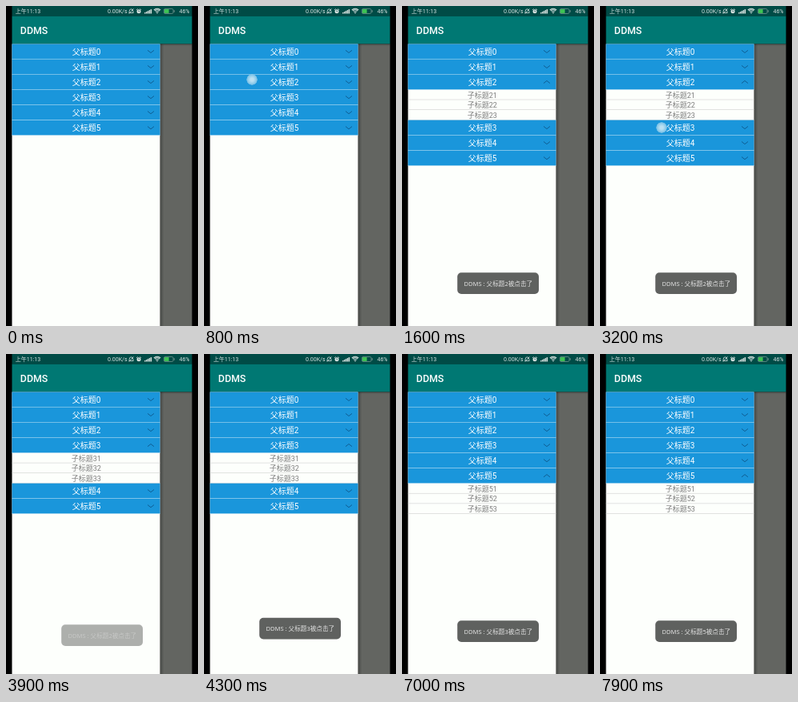
An HTML page with a canvas for the animation above (8000 ms loop, 240x400 px).

```html
<!DOCTYPE html>
<html lang="zh">
<head>
<meta charset="utf-8">
<style>
html, body { margin: 0; width: 100%; height: 100%; overflow: hidden; background: #000; }
canvas { display: block; width: 240px; height: 400px; }
</style>
</head>
<body>
<canvas id="stage"></canvas>
<script>
const LOOP = 8000, STEP = 100;
const FONT = 'Roboto, "Noto Sans CJK SC", "Noto Sans CJK", sans-serif';
const TOAST_FONT = '"Noto Sans", "Noto Sans CJK SC", "Noto Sans CJK", sans-serif';
// a 9:16 screen centred on the stage
const LEFT = 7.5, WIDTH = 225, DRAWER = 185, TOP = 47.5;
const ROW = 19.06, CHILD = 12.65, RULE = 0.6;
const canvas = document.getElementById('stage');
const ctx = canvas.getContext('2d');
const dpr = window.devicePixelRatio || 1;
canvas.width = 240 * dpr;
canvas.height = 400 * dpr;

const taps = [
  { at: 700, x: 60, y: 92, row: 2, open: 900 },
  { at: 3100, x: 77, y: 152, row: 3, open: 3400 },
  { at: 5900, x: 77, y: 190, row: 5, open: 6200 }
];
const toasts = [
  { row: 2, from: 1000, to: 3750 },
  { row: 3, from: 4100, to: 7050 },
  { row: 5, from: 7300, to: 10000 }
];

function rect(x, y, w, h, color) {
  ctx.fillStyle = color;
  ctx.fillRect(x, y, w, h);
}

function text(str, x, y, size, color, align = 'left', weight = 400, font = FONT) {
  ctx.font = `${weight} ${size}px ${font}`;
  ctx.fillStyle = color;
  ctx.textAlign = align;
  ctx.textBaseline = 'alphabetic';
  ctx.fillText(str, x, y);
}

function line(points, color, width) {
  ctx.beginPath();
  points.forEach(([x, y]) => ctx.lineTo(x, y));
  ctx.strokeStyle = color;
  ctx.lineWidth = width;
  ctx.stroke();
}

function disc(x, y, r, color) {
  ctx.beginPath();
  ctx.arc(x, y, r, 0, Math.PI * 2);
  ctx.fillStyle = color;
  ctx.fill();
}

function statusBar() {
  const ink = '#dbe4e2', back = '#004b46';
  rect(LEFT, 0, WIDTH, 12.5, back);
  text('上午11:13', 11.8, 9.2, 7, ink);
  text('0.00K/s', 127, 9.2, 7, ink);
  // muted bell
  ctx.beginPath();
  ctx.arc(156.5, 6.1, 2.2, Math.PI, 0);
  ctx.lineTo(159.2, 8.6);
  ctx.lineTo(153.8, 8.6);
  ctx.closePath();
  ctx.strokeStyle = ink;
  ctx.lineWidth = 0.8;
  ctx.stroke();
  line([[153.8, 9.6], [159.4, 3.4]], ink, 0.8);
  // alarm clock
  disc(166, 6.8, 2.5, ink);
  line([[163.2, 4.8], [164.6, 3.6]], ink, 1);
  line([[168.8, 4.8], [167.4, 3.6]], ink, 1);
  line([[166, 5.4], [166, 7], [167, 7]], back, 0.7);
  for (let i = 0; i < 5; i++) rect(173 + i * 1.9, 8.1 - i, 1.5, 1.4 + i, ink);
  // wifi
  ctx.strokeStyle = ink;
  ctx.lineWidth = 1.1;
  for (const r of [2.4, 4.2, 5.8]) {
    ctx.beginPath();
    ctx.arc(189, 9.1, r, -Math.PI * 0.75, -Math.PI * 0.25);
    ctx.stroke();
  }
  disc(189, 8.8, 0.8, ink);
  // battery
  ctx.strokeStyle = '#7d9c96';
  ctx.lineWidth = 0.7;
  ctx.beginPath();
  ctx.roundRect(197.4, 3.5, 11.6, 6, 1.5);
  ctx.stroke();
  rect(198, 4.1, 5.6, 4.8, '#3fc455');
  rect(209.6, 5.2, 1, 2.6, '#7d9c96');
  text('46%', 229.5, 9.2, 7, ink, 'right');
}

function drawer(open) {
  rect(LEFT, TOP, DRAWER, 400 - TOP, '#fdfffc');
  let y = TOP;
  for (let i = 0; i < 6; i++) {
    rect(LEFT, y, DRAWER, ROW, '#1a96db');
    rect(LEFT, y + ROW - RULE, DRAWER, RULE, '#d4ebf7');
    text('父标题' + i, 100.5, y + 13.2, 10, '#fff', 'center');
    const d = i === open ? -1 : 1;
    const c = y + 9.4;
    line([[177, c - 1.6 * d], [181, c + 1.6 * d], [185, c - 1.6 * d]], '#0f5f95', 1);
    y += ROW;
    if (i !== open) continue;
    for (let k = 1; k <= 3; k++) {
      text(`子标题${i}${k}`, 100.3, y + 9.9, 9, '#7c7c7c', 'center');
      y += CHILD;
      rect(LEFT, y - RULE, DRAWER, RULE, '#cfcfcf');
    }
  }
}

function touch(x, y) {
  const g = ctx.createRadialGradient(x, y, 2, x, y, 7);
  g.addColorStop(0, 'rgba(205,232,244,0.9)');
  g.addColorStop(0.65, 'rgba(170,216,238,0.8)');
  g.addColorStop(0.9, 'rgba(150,205,234,0.7)');
  g.addColorStop(1, 'rgba(150,205,234,0)');
  disc(x, y, 7, g);
}

// rise past the resting place, then settle; sink and fade on leaving
function toast(item, t) {
  const age = t - item.from;
  if (age < 0 || t >= item.to + 300) return;
  let dy = 0, alpha = 1;
  if (t > item.to) {
    const p = (t - item.to) / 300;
    dy = 20 * p * p;
    alpha = 1 - p;
  } else if (age < 200) {
    const p = age / 200;
    dy = 12 - 15.5 * p * (2 - p);
    alpha = 0.3 + 0.7 * p;
  } else if (age < 500) {
    dy = -3.5 * (1 + Math.cos(Math.PI * (age - 200) / 300)) / 2;
  }
  ctx.save();
  ctx.globalAlpha = alpha;
  ctx.translate(0, dy);
  ctx.beginPath();
  ctx.roundRect(69.2, 333.3, 101.8, 26.7, 5);
  ctx.fillStyle = '#5f615f';
  ctx.fill();
  text(`DDMS : 父标题${item.row}被点击了`, 120.3, 349.5, 7.6, '#e2e2e2', 'center', 400, TOAST_FONT);
  ctx.restore();
}

function draw(t) {
  ctx.setTransform(dpr, 0, 0, dpr, 0, 0);
  rect(0, 0, 240, 400, '#000');
  statusBar();
  rect(LEFT, 12.5, WIDTH, TOP - 12.5, '#007873');
  text('DDMS', 17.8, 34.9, 12.4, '#fff', 'left', 500);
  const side = LEFT + DRAWER;
  rect(side, TOP, WIDTH - DRAWER, 400 - TOP, '#636561');
  const edge = ctx.createLinearGradient(side, 0, side + 5, 0);
  edge.addColorStop(0, 'rgba(0,0,0,0.3)');
  edge.addColorStop(1, 'rgba(0,0,0,0)');
  rect(side, TOP, 5, 400 - TOP, edge);
  const shade = ctx.createLinearGradient(0, TOP, 0, TOP + 3);
  shade.addColorStop(0, 'rgba(0,0,0,0.2)');
  shade.addColorStop(1, 'rgba(0,0,0,0)');
  rect(side, TOP, WIDTH - DRAWER, 3, shade);

  let open = -1;
  for (const tap of taps) if (t >= tap.open) open = tap.row;
  drawer(open);
  for (const tap of taps) if (t >= tap.at && t < tap.at + 200) touch(tap.x, tap.y);
  for (const item of toasts) toast(item, t);
}

const start = performance.now();
function frame() {
  const t = (performance.now() - start) % LOOP;
  draw(Math.floor(t / STEP) * STEP);
  requestAnimationFrame(frame);
}
frame();
</script>
</body>
</html>
```
